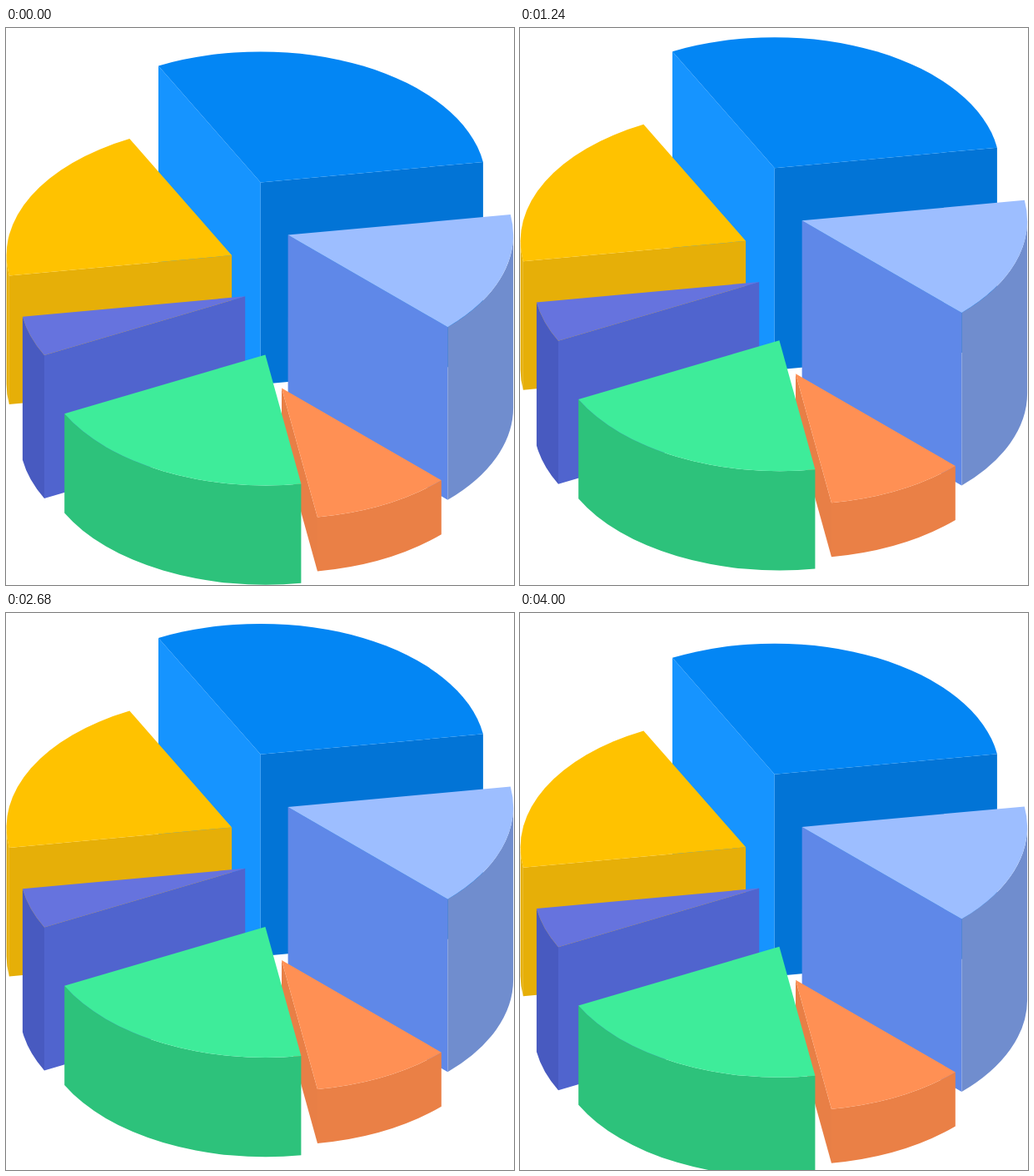
These frames come from a looping animation (610 px wide and 669 px high, 4040 ms). An HTML page:

```html
<!DOCTYPE html>
<html lang="en">
<head>
<meta charset="utf-8">
<title>Pie chart</title>
<style>
html, body { margin: 0; width: 100%; height: 100%; overflow: hidden; background: #fff; }
svg { display: block; width: 610px; height: 669px; }
</style>
</head>
<body>
<svg viewBox="0 0 610 669"><g id="pie"></g></svg>
<script>
const RX = 270.5, RY = 157;
const LOOP = 4040, STEP = 40, TURN = 2000, RISE = -27.8, END = 9;
const pie = document.getElementById('pie');

// Rim points, relative to the tip of a slice
const rim = {
  a: [-122.7, -139.9],
  b: [-267.3, 24.5],
  c: [-241.2, 70.7],
  d: [43, 155],
  e: [191.8, 110.7],
  f: [267.2, -24.5],
  left: [-RX, 0],
  right: [RX, 0]
};
const tip = [0, 0];

// Slices from back to front; "curve" runs clockwise, "walls" are the flat cut faces
const slices = [
  { at: [305.7, 185.4], depth: 242.5, from: 'a', to: 'f', top: '#0386f4',
    walls: [['a', '#1694ff'], ['f', '#0274d6']] },
  { at: [271.1, 273], depth: 154.5, from: 'b', to: 'a', top: '#ffc200',
    walls: [['b', '#e6af08']], curve: ['b', 'left', '#e5af0a'] },
  { at: [338.6, 248.6], depth: 207.5, from: 'f', to: 'e', top: '#9dbeff',
    walls: [['e', '#5f88e8']], curve: ['right', 'e', '#708dce'] },
  { at: [287.2, 322.3], depth: 172, from: 'c', to: 'b', top: '#6673de',
    walls: [['c', '#5064ce']], curve: ['c', 'b', '#485ac0'] },
  { at: [331, 432.5], depth: 65, from: 'e', to: 'd', top: '#ff9054',
    walls: [['d', '#e87f46']], curve: ['e', 'd', '#ea8046'] },
  { at: [311.4, 392.5], depth: 119.3, from: 'd', to: 'c', top: '#3eec9a',
    walls: [], curve: ['d', 'c', '#2dc27b'] }
];

const down = ([x, y], depth) => [x, y + depth];
const arc = (point, sweep) => `A${RX} ${RY} 0 0 ${sweep} ${point}`;

function addFace(group, d, fill) {
  const path = document.createElementNS(pie.namespaceURI, 'path');
  path.setAttribute('d', d);
  path.setAttribute('fill', fill);
  group.appendChild(path);
}

for (const { at, depth, from, to, top, walls, curve } of slices) {
  const group = document.createElementNS(pie.namespaceURI, 'g');
  group.setAttribute('transform', `translate(${at})`);
  for (const [name, fill] of walls) {
    const p = rim[name];
    addFace(group, `M${tip}L${p}L${down(p, depth)}L${down(tip, depth)}Z`, fill);
  }
  if (curve) {
    const p = rim[curve[0]], q = rim[curve[1]];
    addFace(group, `M${p}${arc(q, 1)}L${down(q, depth)}${arc(down(p, depth), 0)}Z`, curve[2]);
  }
  addFace(group, `M${tip}L${rim[from]}${arc(rim[to], 1)}Z`, top);
  pie.appendChild(group);
}

// Steady rise, then a faster steady fall that ends below the start
function offsetAt(t) {
  return t < TURN
    ? RISE * t / TURN
    : RISE + (END - RISE) * (t - TURN) / (LOOP - TURN);
}

const start = performance.now();

function draw(now) {
  const t = Math.floor(Math.max(0, now - start) % LOOP / STEP) * STEP;
  pie.setAttribute('transform', `translate(0 ${offsetAt(t).toFixed(2)})`);
  requestAnimationFrame(draw);
}
draw(start);
</script>
</body>
</html>
```
